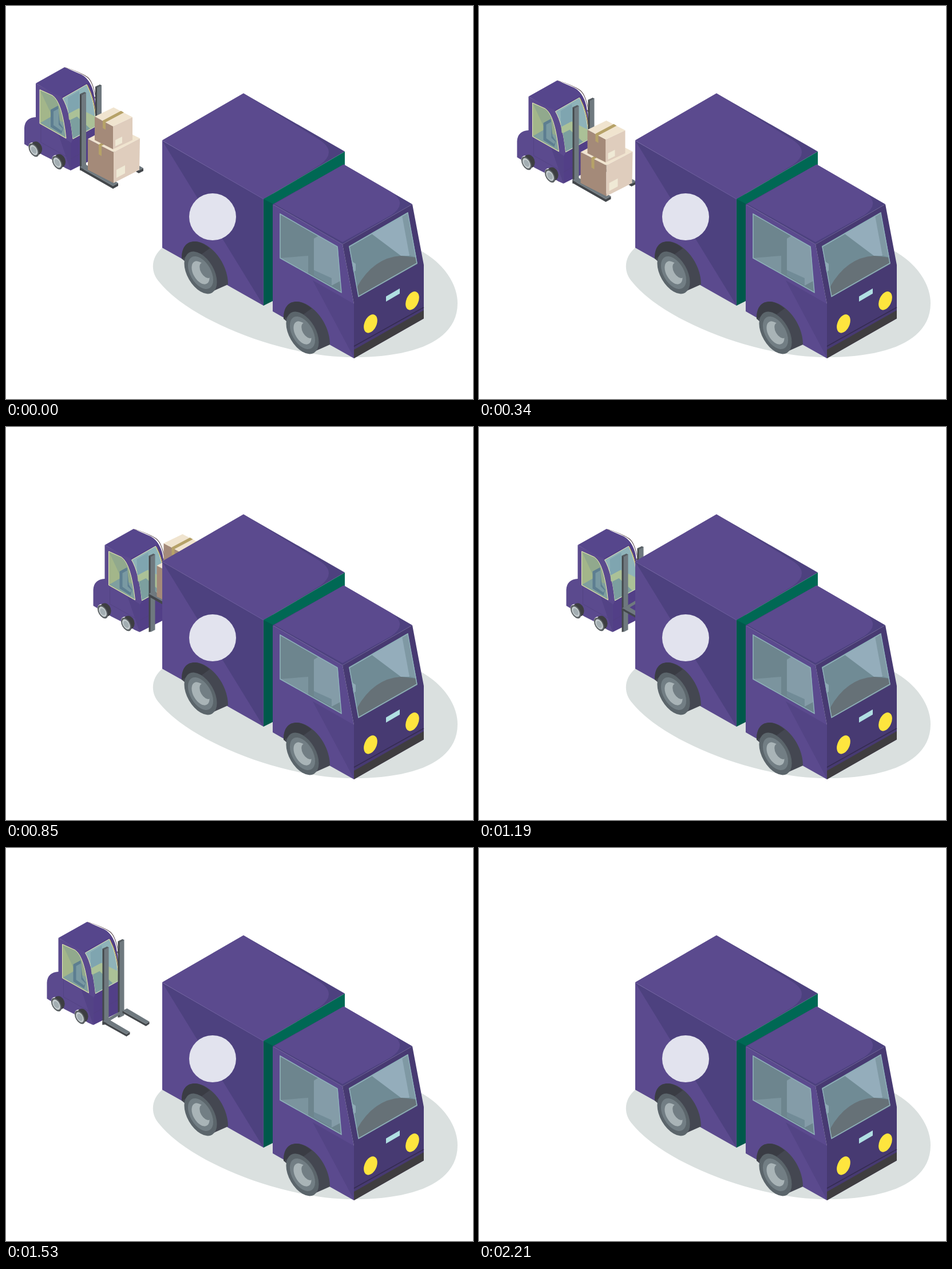
Write an HTML page that moves like this. It is 816 by 686 pixels and loops after 2380 ms.

```html
<!DOCTYPE html>
<html lang="en">
<head>
<meta charset="utf-8">
<title>Loading a truck</title>
<style>
  html, body { margin: 0; width: 100%; height: 100%; overflow: hidden; background: #fff; }
  svg { display: block; width: 100%; height: 100%; }
  .purple { fill: #5b4a8e; }
  .shade { fill: #4d417f; }
  .steel { fill: #6f797f; }
  .iron { fill: #43474b; }
  .tape { fill: #b6a268; }
  .label { fill: #efe9d5; }
  .left { fill: #a48a79; }
  .right { fill: #dfcdbd; }
  .top { fill: #f0e4cf; }
</style>
</head>
<body>
<svg viewBox="0 0 816 686">
  <defs>
    <g id="truckWheel">
      <path fill="#444751" d="M307 441C307 419 317 411 330 411C358 412 388 449 388 486L352 502L330 460Z"/>
      <path fill="#3a3c44" d="M307 441C307 419 317 411 330 411C339 411 348 416 356 423L338 436L313 438Z"/>
      <g transform="matrix(.866 .5 0 1 340 465.5)">
        <circle r="33" fill="#5b656b"/>
        <circle r="25.5" fill="#727e84"/>
        <circle r="18" fill="#a9b4b7"/>
        <circle cx="10" cy="-9" r="12" fill="#727e84"/>
      </g>
    </g>
    <g id="smallWheel">
      <path fill="#fff" d="M-11 -3Q-11 -14 -2 -13L0 -8L-9 2Z"/>
      <ellipse cx="4" cy="-1.500" rx="9.500" ry="12" transform="rotate(-20)" fill="#3d3e42"/>
      <g transform="matrix(.866 .5 0 1 -1.500 .5)">
        <circle r="10.500" fill="#5a6063"/>
        <circle r="8" fill="#c5cdcf"/>
        <circle r="5.500" fill="#a3aeb2"/>
      </g>
    </g>
  </defs>

  <g id="forklift">
    <!-- body and cab -->
    <path fill="#6d5c62" d="M102 106.500Q130 115 143 124Q153 132 158 164L154 160Q149 134 139 126Z"/>
    <path fill="#fff" d="M106 108Q130 116 142 125Q151 132 156 158L153 160Q148 136 138 127Z"/>
    <path fill="#523f87" d="M102 107L131 119.500Q147 127 153 151Q158 176 159 205V264L113 287L96 160Z"/>
    <path class="purple" d="M52 135L92 157Q109 172 113 237V287L104 283L80 268L64 260L42 247L32 241V213Q33 195 52 194Z"/>
    <path fill="#56468c" d="M52 135L102 107L131 119.500Q140 124 144 133L97 159L90 157Z"/>
    <path class="purple" d="M82 153L97 158Q112 180 117 233L113 240L105 233Q101 174 82 155Z"/>
    <path fill="none" stroke="#51417f" stroke-width=".7" d="M61 206V238L113 267L158 242"/>
    <path fill="#534386" d="M92 225L113 238V287Z"/>
    <!-- side window -->
    <path fill="#a3b68a" stroke="#e7ebb8" d="M59 146L81 156Q98 167 105 231L59 205Z"/>
    <path fill="#91a98d" d="M60 148L81 157Q97 168 104 229L82 195Z"/>
    <path fill="#7f9f9f" d="M60 204L79 193L100 203L104 229Z"/>
    <path fill="#5d7e91" d="M78 181L91 174L94 204L100 213L97 223L78 211Z"/>
    <path fill="#7999a2" d="M83 184L92 179V207L99 214L97 218L83 208Z"/>
    <!-- windscreen -->
    <path fill="#8fb3b9" stroke="#e7ebb8" d="M99 161L141 137Q155 163 157 210L117 232Q112 183 99 161Z"/>
    <path fill="#abc197" d="M109 188L126 178L156 193L157 209L141 218L110 198Z"/>
    <path fill="#7fa5b0" d="M108 160L128 148V178L109 188Z"/>
    <path fill="#7c9f9f" d="M112 199L124 193L147 214L117 231Z"/>
    <path fill="none" stroke="#c9b84a" d="M142 138Q155 163 157 193"/>
    <use href="#smallWheel" x="50" y="251"/>
    <use href="#smallWheel" x="91" y="273"/>

    <!-- masts -->
    <g id="mast">
      <path class="iron" d="M129 154L133 152V286L129 287Z"/>
      <path class="steel" d="M132 155L140 151V283L132 287Z"/>
      <path fill="#565d62" d="M129 154L137 150L140 151.500L132 156Z"/>
    </g>
    <use href="#mast" x="27" y="-13"/>

    <g id="lift">
      <g id="shortForks">
        <path class="iron" d="M129 281L161 263V268L129 286Z"/>
        <path class="steel" d="M129 281L160 263L168 264L136 283Z"/>
        <g id="shortFork">
          <path class="iron" d="M130 280L171 303L177 299V303L171 307L130 284Z"/>
          <path class="steel" d="M130 280L138 276L177 299L171 303Z"/>
        </g>
        <use href="#shortFork" x="34" y="-18"/>
      </g>
      <g id="load">
        <path class="iron" d="M180 257L232 287L240 283V288L232 292L180 262Z"/>
        <path class="steel" d="M180 257L188 253L240 283L232 287Z"/>
        <path class="iron" d="M129 281L187 314L196 309V314L187 319L129 286Z"/>
        <path class="steel" d="M129 281L138 276L196 309L187 314Z"/>
        <!-- large carton -->
        <path class="left" d="M143 232L188 255V309L143 286Z"/>
        <path class="right" d="M188 255L234 231L233 286L188 309Z"/>
        <path class="top" d="M143 232L188 208L234 231L188 255Z"/>
        <path class="tape" d="M162 242L170 237L175 240L167 244V262L162 259Z"/>
        <path class="label" d="M193 286L208 278V292L193 300Z"/>
        <!-- small carton -->
        <path class="left" d="M155 193L187 210V250L155 234Z"/>
        <path class="right" d="M187 210L221 194V234L187 250Z"/>
        <path class="top" d="M155 193L188 177L221 194L187 210Z"/>
        <path class="tape" d="M169 200L201 183L206 186L174 203V216L169 213Z"/>
        <path class="label" d="M191 234L203 228V239L191 245Z"/>
      </g>
    </g>
  </g>

  <!-- truck -->
  <path fill="#dae0df" d="M273 422C254 438 251 463 268 482C320 547 480 613 608 613C716 613 789 583 789 519C789 484 764 450 728 429L600 380Z"/>
  <path class="purple" d="M273 235L450 337V523L388 488L307 441L273 422Z"/>
  <path class="shade" d="M273 235L450 337V523Z"/>
  <path class="shade" d="M273 234.500L415 152.500L592 254L450 337Z"/>
  <path class="purple" d="M273 234.500L415 152.500L547 233Q580 254 549 277L450 337Z"/>
  <path fill="none" stroke="#6f60a0" stroke-width=".8" d="M273 235L450 337V523"/>
  <circle cx="361" cy="368" r="41" fill="#e2e3ee"/>
  <path fill="#00594b" d="M450 337L466 328V515L450 523Z"/>
  <path fill="#006854" d="M450 337L592 254V278L466 348V345Z"/>

  <path class="purple" d="M466 346L588 416L608 520V615L567 592L487 545L466 533Z"/>
  <path fill="#534485" d="M536 479L608 520V614Z"/>
  <path fill="#473a72" d="M588 416L710 346L730 452V545.500L608 615V520Z"/>
  <path class="shade" d="M466 346L590 276.500L710 346L588 416Z"/>
  <path class="purple" d="M469 345.500L590 276.500L672 324Q704 344 673 365L588 412Z"/>

  <!-- side window -->
  <path fill="#6d858e" d="M478 362L579 420L586 501L478 440Z"/>
  <path fill="#7b949e" d="M478 440L528 436V468Z"/>
  <path fill="#849ca8" d="M538 406L546 401L580 421L584 480L569 488L538 461Z"/>
  <path fill="#718b97" d="M538 461L569 475V488L538 470Z"/>
  <path fill="none" stroke="#8eafba" stroke-width="1.500" d="M479 363L579 420L586 500L479 440Z"/>
  <!-- windscreen -->
  <path fill="#708b95" d="M599 419L702 360L719 450L616 508Z"/>
  <path fill="#7f99a4" d="M690 367L702 360L717 439L704 435Z"/>
  <path fill="#94adbb" d="M638 397L692 366L705 436L690 436Z"/>
  <path fill="#8fa9b5" d="M605 446L611 450V462L607 464Z"/>
  <path fill="#667177" d="M613 491Q642 439 690 436L717 439L719 450L616 508Z"/>
  <path fill="none" stroke="#8eafba" stroke-width="1.500" d="M600 420L702 361L718 449L616 507Z"/>

  <path fill="#3f3d40" d="M608 600L730 531V545.500L608 615Z"/>
  <path fill="none" stroke="#352c52" stroke-width="1.500" d="M608 594L730 526"/>
  <path fill="#b0dfe2" d="M664 507L688 493V502L664 516Z"/>
  <g fill="#fee53e">
    <ellipse rx="10.500" ry="17" transform="translate(637 554.500) rotate(24)"/>
    <ellipse rx="10.500" ry="17" transform="translate(710 514.500) rotate(24)"/>
  </g>
  <use href="#truckWheel"/>
  <use href="#truckWheel" x="178" y="105"/>
</svg>

<script>
  const STEP = 170;
  // One pose per step: forklift x, forklift y, fork height.
  const poses = [
    [0, 0, 0], [15.5, 10.5, 0], [34.5, 23, 0], [64, 38.5, 20], [83.5, 50, 40],
    [120.5, 71, 61], [153, 90, 74], [120.5, 71, 35], [84.5, 49, 15],
    [39.5, 22, 0], [8.5, 4.5, 0], [-31, -18, 0], [-98, -55.5, 0], [-300, -170, 0]
  ];
  const UNLOADED_FROM = 7;
  const [forklift, lift, load, shortForks] =
    ["forklift", "lift", "load", "shortForks"].map(id => document.getElementById(id));

  const move = (node, x, y) => node.setAttribute("transform", `translate(${x} ${y})`);
  const show = (node, visible) => node.setAttribute("visibility", visible ? "visible" : "hidden");

  function draw() {
    const step = Math.floor(performance.now() / STEP) % poses.length;
    const [x, y, height] = poses[step];
    const loaded = step < UNLOADED_FROM;
    move(forklift, x, y);
    move(lift, 0, -height);
    show(load, loaded);
    show(shortForks, !loaded);
    requestAnimationFrame(draw);
  }
  draw();
</script>
</body>
</html>
```
